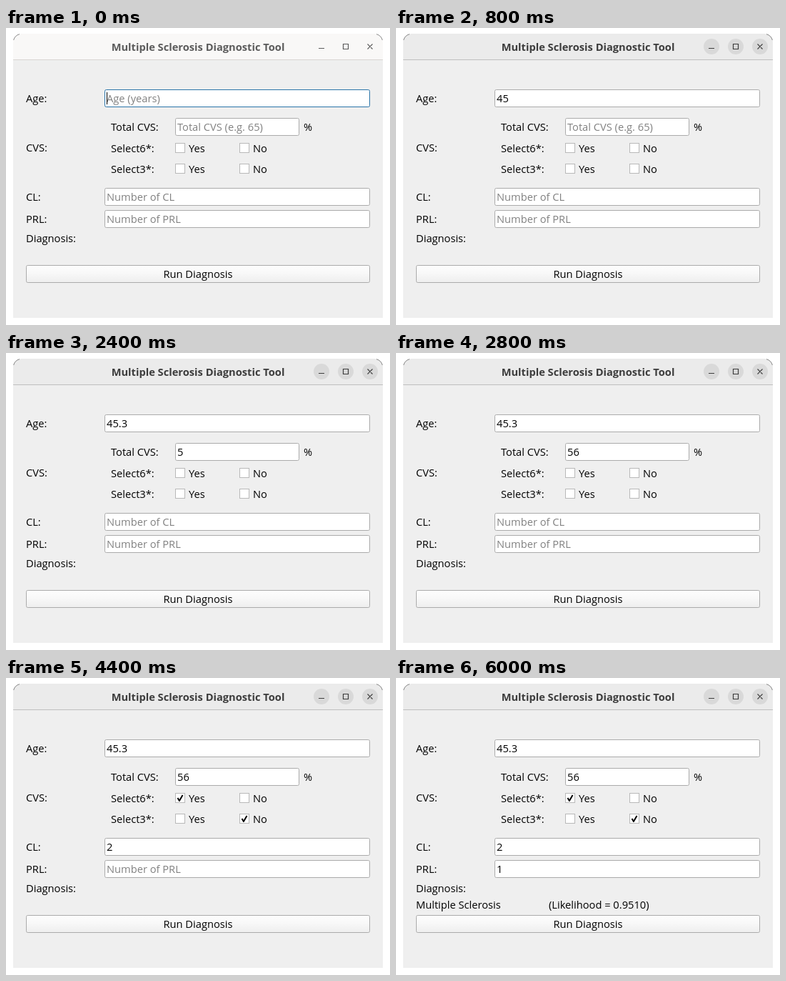
Recreate the animation shown at these times as an HTML page. Size 538 by 416 pixels, loop 9000 ms.

```html
<!DOCTYPE html>
<html lang="en">
<head>
<meta charset="utf-8">
<title>Diagnostic form</title>
<style>
html, body { margin: 0; width: 100%; height: 100%; overflow: hidden; background: #fff; }
svg { display: block; width: 538px; height: 416px; }
text { font: 14.67px "Open Sans", "Noto Sans", sans-serif; fill: #000; white-space: pre; }
.title { font-weight: 700; fill: #3d3d3d; text-anchor: middle; }
.mid { text-anchor: middle; }
.hint { fill: #818181; }
.bar { fill: #ebebeb; }
.rule { fill: #bfbfbf; }
.disc { fill: #d9d9d9; }
.icon { fill: none; stroke: #3d3d3d; stroke-width: 1.2; }
.field { fill: #fff; stroke: #ababab; }
.box { fill: #fff; stroke: #b9b9b9; }
.tick { fill: none; stroke: #000; stroke-width: 2; stroke-linejoin: round; }
.inactive .bar { fill: #f9f8f7; }
.inactive .rule { fill: #d8d5d2; }
.inactive .title { fill: #5c5c5c; }
.inactive .icon { stroke: #5c5c5c; }
.inactive .disc { display: none; }
.inactive .focus { stroke: #2a74a8; }
</style>
</head>
<body>
<svg id="stage" viewBox="0 0 538 416">
  <defs>
    <linearGradient id="face" x1="0" y1="0" x2="0" y2="1">
      <stop offset="0" stop-color="#fdfdfd"/>
      <stop offset=".45" stop-color="#f8f8f8"/>
      <stop offset="1" stop-color="#eeeeee"/>
    </linearGradient>
  </defs>
  <path fill="#efefef" d="M10 40H528V406H10Z"/>
  <path class="bar" d="M10 44V20A12 12 0 0 1 22 8H516A12 12 0 0 1 528 20V44Z"/>
  <path fill="none" stroke="#333" stroke-width=".8" opacity=".7"
        d="M10.6 17A12 12 0 0 1 19 8.6M519 8.6A12 12 0 0 1 527.4 17"/>
  <path class="rule" d="M10 44H528V45H10Z"/>
  <text class="title" x="269" y="32">Multiple Sclerosis Diagnostic Tool</text>
  <g class="disc">
    <circle cx="442" cy="26" r="11"/><circle cx="476" cy="26" r="11"/><circle cx="510" cy="26" r="11"/>
  </g>
  <path class="icon" d="M438 28.5H446M472.5 22.5H479.5V29.5H472.5ZM506.5 22.5L513.5 29.5M513.5 22.5L506.5 29.5"/>
  <g id="form"></g>
</svg>
<script>
const stage = document.getElementById('stage');
const form = document.getElementById('form');

function add(tag, attrs, content = '') {
  const el = document.createElementNS('http://www.w3.org/2000/svg', tag);
  for (const key in attrs) el.setAttribute(key, attrs[key]);
  el.textContent = content;
  return form.appendChild(el);
}
const label = (x, y, words, cls = '') => add('text', { x, y, class: cls }, words);

function field(x, y, width, hint, cls = '') {
  add('rect', { x: x + .5, y: y + .5, width: width - 1, height: 24, rx: 2, class: 'field ' + cls });
  return { text: label(x + 3, y + 18, hint), hint };
}

function checkbox(x, y, words) {
  add('rect', { x: x + .5, y: y + .5, width: 13, height: 13, class: 'box' });
  label(x + 19, y + 13, words);
  return add('path', { class: 'tick', d: `M${x + 3.5} ${y + 7}l2.4 4l4.6 -8` });
}

[
  [28, 104, 'Age:'], [28, 173, 'CVS:'], [28, 242, 'CL:'], [28, 273, 'PRL:'],
  [28, 300, 'Diagnosis:'], [147, 144, 'Total CVS:'], [417, 144, '%'],
  [147, 174, 'Select6*:'], [147, 203, 'Select3*:']
].forEach(item => label(...item));

const inputs = {
  age: field(138, 86, 372, 'Age (years)', 'focus'),
  total: field(237, 126, 174, 'Total CVS (e.g. 65)'),
  cl: field(138, 224, 372, 'Number of CL'),
  prl: field(138, 255, 372, 'Number of PRL')
};
const ticks = { six: checkbox(237, 161, 'Yes'), three: checkbox(327, 190, 'No') };
[[327, 161, 'No'], [237, 190, 'Yes']].forEach(item => checkbox(...item).remove());

add('rect', { x: 28.5, y: 332.5, width: 481, height: 24, rx: 2, fill: 'url(#face)', stroke: '#ababab' });
label(269, 350, 'Run Diagnosis', 'mid');
const results = [label(28, 323, 'Multiple Sclerosis'), label(214, 323, '(Likelihood = 0.9510)')];
const caret = add('rect', { y: 90, width: 1, height: 17 });

// Each step adds to the state before it.
const steps = [
  [0, { caret: 141 }],
  [400, { age: '4', caret: 149 }],
  [800, { age: '45', caret: 0, active: true }],
  [1200, { age: '45.' }],
  [1600, { age: '45.3' }],
  [2400, { total: '5' }],
  [2800, { total: '56' }],
  [3200, { six: true }],
  [3600, { three: true }],
  [4400, { cl: '2' }],
  [5200, { prl: '1' }],
  [6000, { done: true }]
];
const LOOP = 9000;
const show = (el, on) => { el.style.display = on ? '' : 'none'; };

function draw(time) {
  const state = Object.assign({}, ...steps.filter(([at]) => at <= time).map(([, change]) => change));
  stage.classList.toggle('inactive', !state.active);
  for (const key in inputs) {
    const { text, hint } = inputs[key];
    text.textContent = state[key] || hint;
    text.classList.toggle('hint', !state[key]);
  }
  for (const key in ticks) show(ticks[key], state[key]);
  results.forEach(el => show(el, state.done));
  show(caret, state.caret);
  caret.setAttribute('x', state.caret);
}

const start = performance.now();
function tick() {
  draw((performance.now() - start) % LOOP);
  requestAnimationFrame(tick);
}
tick();
</script>
</body>
</html>
```
